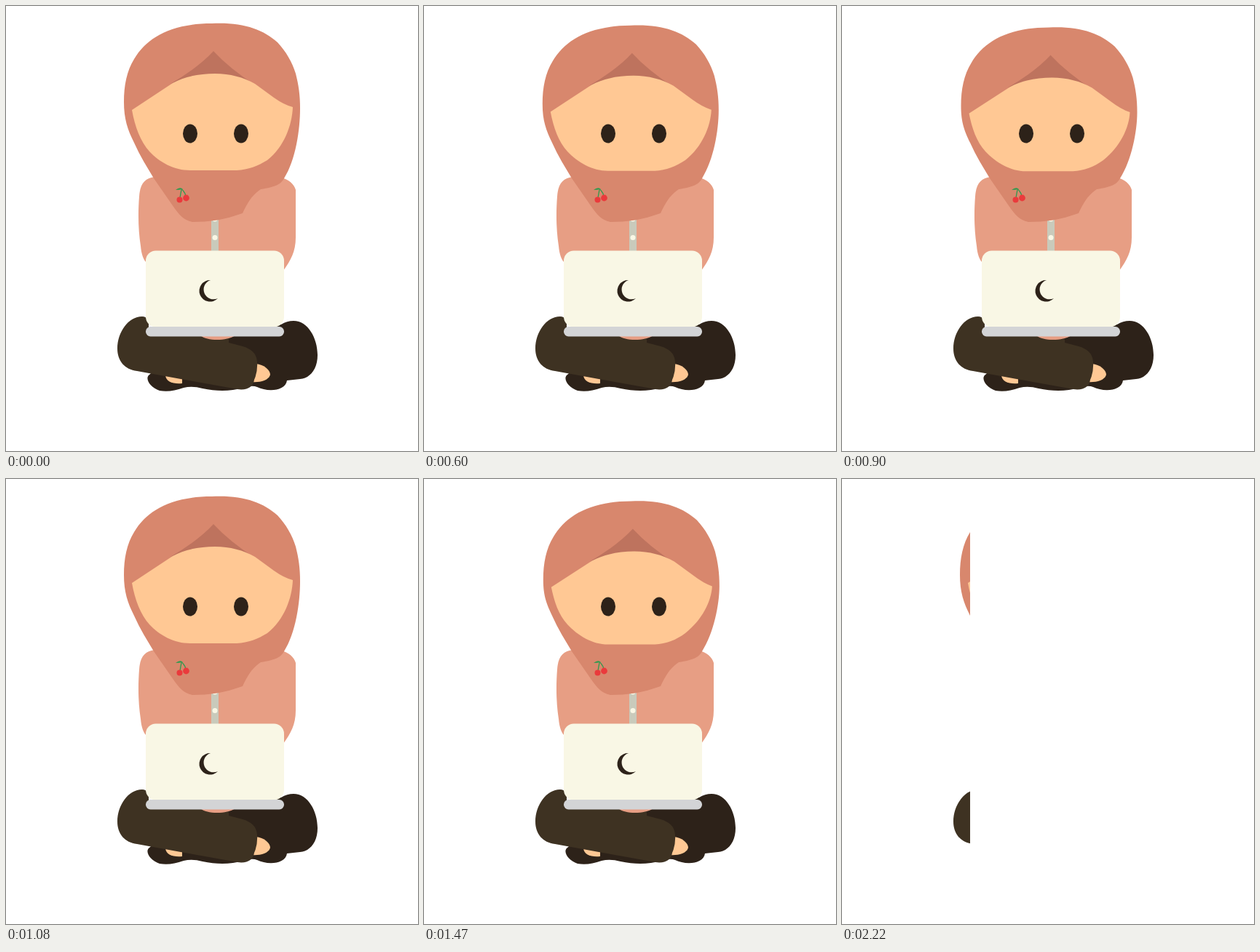
Write an HTML page that moves like this. It is 566 px wide and 612 px high and loops after 2.25 s.

```html
<!DOCTYPE html>
<html lang="en">
<head>
<meta charset="utf-8">
<title>Nodding at the laptop</title>
<style>
  html, body { margin: 0; width: 100%; height: 100%; overflow: hidden; background: #fff; }
  svg { display: block; width: 566px; height: 612px; }
</style>
</head>
<body>
<svg viewBox="0 0 566 612">
  <!-- shirt -->
  <path fill="#e79e84" d="M205 235C190 236 184 246 183 262C181 288 182 310 185 330C186 342 189 350 194 354H381V364C391 350 398 338 398 318V253C396 245 388 238 378 236Z"/>
  <path fill="#c9cabb" d="M282 290H292V340H282Z"/>
  <g fill="#f9f7e5"><circle cx="287" cy="293" r="3.5"/><circle cx="287" cy="318.500" r="3.5"/></g>

  <!-- legs -->
  <path fill="#2d2219" d="M300 450L378 438Q386 433 395 433C415 433 428 457 428 480C428 499 418 512 404 513L386 515C384 530 359 531 345 524Q338 521 326 525C308 530 290 530 270 526Q256 522 244 525C232 529 222 531 211 529C198 525 190 512 197 507L205 500Z"/>
  <g fill="#ffc894">
    <path d="M219 508C220 517 229 520 242 519V508Z"/>
    <path d="M343 492C355 493 363 501 363 507C361 515 349 518 337 517Z"/>
  </g>
  <path fill="#3e3222" d="M187 427C168 427 153 449 153 471C153 488 163 500 180 502L240 513L318 527C332 529 340 523 341 514Q346 503 345 489C344 478 338 472 325 468L306 463V450H196V432Q192 427 187 427Z"/>
  <path fill="#e79e84" d="M267 453C276 461 303 461 315 453Z"/>

  <!-- laptop -->
  <rect x="192" y="336.500" width="190" height="105" rx="14" fill="#f9f7e5"/>
  <rect x="192" y="441" width="190" height="13.5" rx="6.5" fill="#d3d4d6"/>
  <path fill="#2d2219" d="M281 377A14.800 14.800 0 1 0 291 402A13.500 13.500 0 1 1 281 377Z"/>

  <!-- head -->
  <path id="scarf" fill="#d8876d"/>
  <path id="fold" fill="#be735e"/>
  <path id="face" fill="#ffc894"/>
  <g fill="#2d2219">
    <ellipse cx="253" cy="175.500" rx="10" ry="13"/>
    <ellipse cx="323" cy="175.500" rx="10" ry="13"/>
  </g>

  <!-- cherries -->
  <g fill="none" stroke="#2f9a4e" stroke-width="1.300">
    <path d="M240 251Q246 255 247 262M241 253Q240 257 239 264"/>
  </g>
  <path fill="#2f9a4e" d="M233 253Q239 248 243 252Q238 253 233 253Z"/>
  <g fill="#ea3a3c"><circle cx="238.500" cy="266.500" r="4"/><circle cx="247.500" cy="264" r="4.400"/></g>

  <path id="veil" fill="#fff" fill-rule="evenodd"/>
</svg>
<script>
const LOOP = 2250, START = 480, STOP = 1650, STEP = 30, NOD = 20;

// Blank areas: start time, cleared box, box left visible inside it
const cuts = [
  [720, [162, 23, 406, 238], [163, 30, 399, 155]],
  [1290, [162, 23, 407, 294], [175, 126, 407, 238]],
  [2220, [176, 23, 429, 532]]
];

const parts = {};
for (const id of ['scarf', 'fold', 'face', 'veil']) parts[id] = document.getElementById(id);
const setPath = (id, d) => parts[id].setAttribute('d', d);
const box = ([l, t, r, b]) => `M${l} ${t}H${r}V${b}H${l}Z`;

function drawHead(k) {
  // p follows the nod; extra lets single points travel further
  const p = (x, y, extra = 0) => `${x + 2.3 * k} ${y + (8.3 + extra) * k} `;
  const drop = 2 * k;

  setPath('scarf', `M203 237C194 222 184 206 176 188C${p(167, 170, -5)} ${p(162, 155)} ${p(162, 132)}
    C${p(162, 109)} ${p(166, 89)} ${p(176, 73)} C${p(193, 44)} ${p(226, 24)} ${p(283, 24)}
    C${p(325, 22)} ${p(353, 32)} ${p(373, 50)} C${p(385, 63)} ${p(393, 77)} ${p(398, 93)}
    C${p(402, 109)} ${p(404, 122)} ${p(404, 141)} C${p(404, 170, -5)} 398 212 382 237
    C378 245 370 249 350 252C338 260 332 270 325 285C300 294 280 297 256 297
    C243 294 238 287 230 276Z`);

  setPath('fold', `M${p(285, 62)} Q${p(265, 84)} ${p(226, 107)} Q${p(286, 85)} ${p(344, 110)}
    Q${p(307, 86)} ${p(285, 62)}Z`);

  setPath('face', `M${p(173, 143, -1)} L${p(229, 106)} C${p(245, 97)} ${p(266, 93)} ${p(287, 93)}
    C${p(308, 93)} ${p(326, 98)} ${p(342, 107)} L${p(368, 126)} Q${p(382, 136, 1)} ${p(394, 139, 2.5)}
    C${p(393, 164, -3)} 382 194 359 212C346 ${220 + drop} 333 ${225 + drop} 317 ${226 + drop}
    H253C231 ${226 + drop} 211 215 197 200C185 187 ${p(177, 166, -5)} ${p(173, 143, -1)}Z`);
}

function draw(t) {
  const step = Math.floor((t - START) / STEP);
  const moving = t >= START && t < STOP;
  drawHead(moving ? Math.sin(Math.PI * step / NOD) ** 2 : 0);

  const cut = cuts.find(([at]) => t >= at && t < at + STEP);
  setPath('veil', cut ? cut.slice(1).map(box).join('') : '');
}

function tick() {
  draw((performance.now() - t0) % LOOP);
  requestAnimationFrame(tick);
}

const t0 = performance.now();
tick();
</script>
</body>
</html>
```
